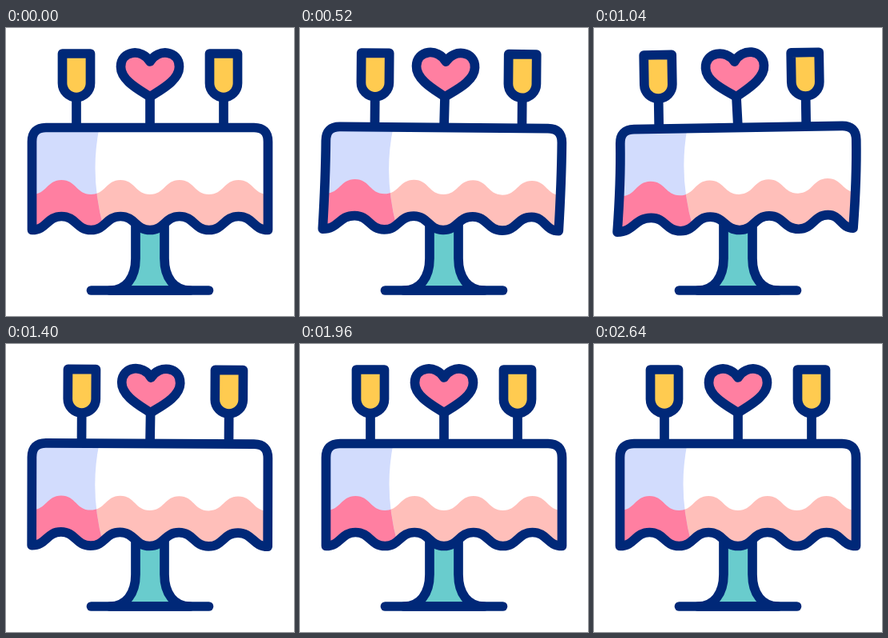
An HTML page that plays this animation: 360 by 360 pixels, repeating every 2.72 s.

```html
<!DOCTYPE html>
<html lang="en">
<head>
<meta charset="utf-8">
<title>Swaying table</title>
<style>
  html, body { margin: 0; width: 100%; height: 100%; overflow: hidden; background: #fff; }
  svg { display: block; width: 100%; height: 100%; }
  .line { stroke: #002878; stroke-width: 11.7; stroke-linecap: round; stroke-linejoin: round; }
</style>
</head>
<body>
<svg viewBox="0 0 360 360" fill="none">
  <defs>
    <clipPath id="clip"><path class="cloth"/></clipPath>
    <clipPath id="shade"><path d="M0 110H119L116.5 125Q104.5 185 121.5 248L124 270H0Z"/></clipPath>
    <g id="glass" class="line">
      <path d="M88 90V122"/>
      <path fill="#ffcb50" d="M70.5 32H105.5V69a17.5 17.5 0 0 1-35 0Z"/>
    </g>
  </defs>

  <g class="line">
    <path fill="#69cccd" d="M162 246V288C162 312 150 328 130 328H230C210 328 198 312 198 288V246"/>
    <path d="M106.5 328H253.5"/>
  </g>

  <g id="heart" class="line">
    <path d="M180 86V122"/>
    <path fill="#ff7fa1" d="M180 86C168 78 143.5 66 143.5 48.5C143.5 28 170 25 180 42C190 25 216.5 28 216.5 48.5C216.5 66 192 78 180 86Z"/>
  </g>

  <g id="table">
    <g id="glasses">
      <use href="#glass"/>
      <use href="#glass" x="184"/>
    </g>
    <path class="cloth" fill="#fff"/>
    <g clip-path="url(#clip)">
      <path class="band" fill="#ffbfba"/>
      <g clip-path="url(#shade)">
        <path fill="#d2dcfd" d="M0 110H180V270H0Z"/>
        <path class="band" fill="#ff7fa1"/>
      </g>
    </g>
    <path class="cloth line"/>
  </g>
</svg>
<script>
const LOOP = 2720, STEP = 40;
const PUSH = 320, REST = 1960, HALF_SWING = 360;
const LEFT = 32.5, RIGHT = 327.5, TOP = 124.5, SCALLOPS = 4;

// Eased push to the first extreme, then a swing around `lean` that dies out at REST
function sway(t, swing, lean, fade) {
  if (t < PUSH) return (swing + lean) * (1 - Math.cos(Math.PI * t / PUSH)) / 2;
  const left = Math.max(0, (REST - t) / (REST - PUSH));
  return (swing * Math.cos(Math.PI * (t - PUSH) / HALF_SWING) + lean) * left ** fade;
}

// Scalloped edge drawn left to right; its two ends may shift sideways
function wave(low, high, shift = 0) {
  const count = SCALLOPS * 2, last = count;
  const x = i => LEFT + (RIGHT - LEFT) * i / count + (i === 0 || i === last ? shift : 0);
  const y = i => i % 2 ? high : low;
  let d = `${x(0)} ${y(0)}`;
  for (let i = 1; i <= count; i++) {
    const mid = (x(i - 1) + x(i)) / 2;
    d += `C${mid} ${y(i - 1)} ${mid} ${y(i)} ${x(i)} ${y(i)}`;
  }
  return d;
}

const cloth = shift => `M${wave(252.5, 235.5, shift)}Q${RIGHT} 190 ${RIGHT} 142Q${RIGHT} ${TOP} 310 ${TOP}` +
  `H50Q${LEFT} ${TOP} ${LEFT} 142Q${LEFT} 190 ${LEFT + shift} 252.5Z`;

const setPaths = (selector, d) => document.querySelectorAll(selector).forEach(el => el.setAttribute('d', d));
const move = (id, value) => document.getElementById(id).setAttribute('transform', value);

setPaths('.band', `M10 290V208L${wave(208, 190)}L350 208V290Z`);

function draw(now) {
  const t = Math.floor(now % LOOP / STEP) * STEP;
  move('table', `rotate(${sway(t, -3.9, 0, 2.4)} 180 125)`);
  move('heart', `rotate(${sway(t, -12, 0, 2.4)} 180 125)`);
  move('glasses', `translate(${sway(t, -15.5, 3.5, 1)})`);
  setPaths('.cloth', cloth(sway(t, -5.5, -4.5, 1)));
  requestAnimationFrame(draw);
}
draw(performance.now());
</script>
</body>
</html>
```
